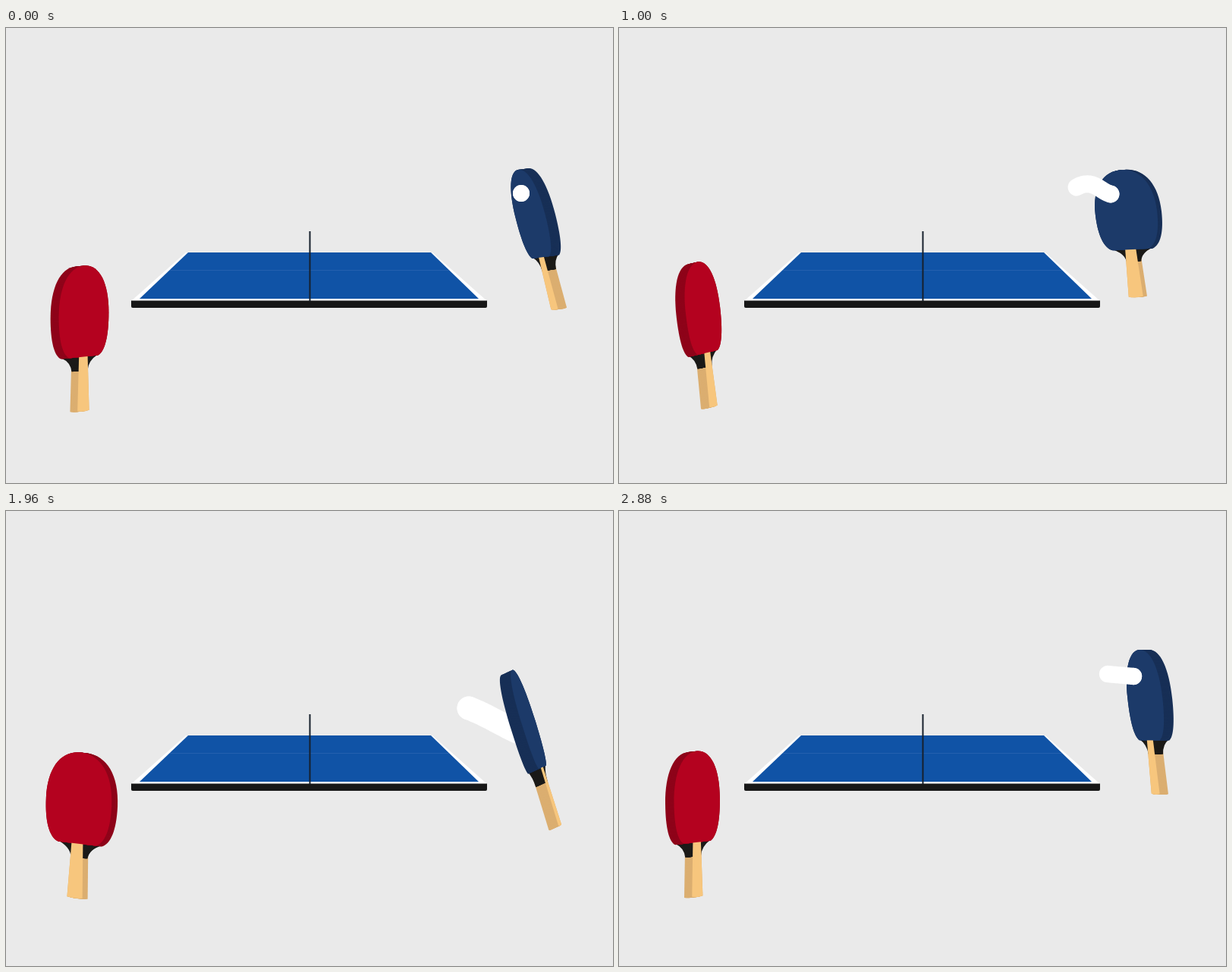
These frames come from a looping animation (800 by 600 pixels, 2920 ms). An HTML page with a canvas:

```html
<!DOCTYPE html>
<html lang="en">
<head>
<meta charset="utf-8">
<title>Table tennis</title>
<style>
html, body { margin: 0; width: 100%; height: 100%; overflow: hidden; background: #eaeaea; }
canvas { display: block; }
</style>
</head>
<body>
<canvas id="stage" width="800" height="600"></canvas>
<script>
const ctx = document.getElementById('stage').getContext('2d');
const LOOP = 2920, STEP = 40, TRAIL = 80;
const BOUNCE_Y = 306;

// time, x, y
const ballKeys = [
  [0, 679, 218], [60, 670, 224], [150, 560, 208], [320, 310, BOUNCE_Y],
  [420, 195, 236], [480, 140, 258], [520, 187, 244], [600, 283, 229],
  [700, 385, 243], [815, 500, BOUNCE_Y], [920, 603, 210], [1000, 648, 219],
  [1025, 655, 222], [1110, 570, 205], [1230, 310, BOUNCE_Y], [1360, 156, 211],
  [1440, 139, 210], [1570, 265, 222], [1720, 505, BOUNCE_Y], [1800, 610, 252],
  [1880, 674, 284], [1910, 676, 292], [1960, 610, 260], [2040, 500, 228],
  [2190, 300, BOUNCE_Y], [2330, 140, 238], [2400, 225, 231], [2480, 342, 234],
  [2560, 417, 253], [2640, 500, BOUNCE_Y], [2735, 603, 211], [2800, 644, 215],
  [2880, 678, 218], [2920, 679, 218]
];

// time, radius
const sizeKeys = [
  [0, 11], [320, 13], [600, 13.5], [920, 11.5], [1025, 11.5],
  [1440, 13.5], [1800, 13.5], [1960, 15.5], [2560, 13.5], [2800, 12], [2920, 11]
];

// time, blade top x y, handle end x y, yaw in degrees
const leftKeys = [
  [0, 97, 314, 97, 506, -51], [100, 100, 320, 94, 511, 0],
  [300, 100, 248, 70, 436, 10], [430, 128, 173, 58, 348, -28],
  [510, 163, 174, 29, 345, -72], [600, 161, 196, 62, 396, -79],
  [840, 98, 319, 106, 511, -66], [1000, 97, 310, 119, 501, -64],
  [1280, 108, 222, 82, 408, -30], [1440, 130, 176, 76, 352, -25],
  [1560, 155, 180, 46, 364, -74], [1900, 103, 325, 93, 517, 25],
  [1960, 103, 319, 94, 511, 34], [2240, 105, 215, 56, 398, 0],
  [2420, 130, 178, 48, 350, -62], [2560, 113, 178, 57, 362, -74],
  [2790, 97, 316, 97, 508, -51], [2920, 97, 314, 97, 506, -51]
];

const rightKeys = [
  [0, 682, 186, 729, 371, 68], [70, 668, 196, 728, 388, 80],
  [140, 662, 215, 720, 412, 84], [600, 699, 273, 671, 456, 55],
  [900, 674, 194, 688, 370, 38], [1000, 665, 187, 684, 355, 28],
  [1120, 660, 206, 717, 398, 76], [1340, 702, 286, 694, 478, 18],
  [1440, 693, 285, 682, 474, 18], [1700, 718, 240, 690, 430, 62],
  [1880, 693, 198, 755, 400, 92], [1960, 660, 213, 724, 418, 99],
  [2040, 664, 238, 712, 440, 94], [2240, 706, 268, 690, 460, 65],
  [2420, 728, 262, 678, 451, 58], [2560, 722, 249, 670, 436, 62],
  [2790, 705, 188, 730, 379, 66], [2880, 693, 183, 713, 374, 64],
  [2920, 682, 186, 729, 371, 68]
];

const red = { face: '#b4021f', edge: '#8e0319' };
const blue = { face: '#1c3a69', edge: '#172f56' };
const wood = { face: '#f7c67d', edge: '#dbae70' };
const black = '#1b1a18';

// Smooth curve through keys, sharp where the ball meets the table.
function slope(keys, i, c, chord) {
  if (c === 2 && keys[i][2] === BOUNCE_Y) return chord * 1.3;
  const last = keys.length - 1;
  const a = i === 0 ? keys[last - 1] : keys[i - 1];
  const b = i === last ? keys[1] : keys[i + 1];
  const dt = (b[0] - a[0] + LOOP) % LOOP;
  return (b[c] - a[c]) / dt;
}

function sample(keys, t) {
  let i = 0;
  while (i < keys.length - 2 && t >= keys[i + 1][0]) i++;
  const a = keys[i], b = keys[i + 1], d = b[0] - a[0], u = (t - a[0]) / d;
  return a.slice(1).map((v, k) => {
    const c = k + 1, gap = b[c] - v, chord = gap / d;
    const m = slope(keys, i, c, chord) * d, n = slope(keys, i + 1, c, chord) * d;
    return v + u * (m + u * (3 * gap - 2 * m - n + u * (m + n - 2 * gap)));
  });
}

function poly(color, points) {
  ctx.fillStyle = color;
  ctx.beginPath();
  points.forEach(([x, y]) => ctx.lineTo(x, y));
  ctx.closePath();
  ctx.fill();
}

function drawTable() {
  poly('#fff', [[237, 296], [562, 296], [634, 360], [165, 360]]);
  poly('#1053a6', [[240, 296], [560, 296], [623, 357], [176, 357]]);
  ctx.fillStyle = '#2460ae';
  ctx.fillRect(216, 319, 368, 1);
  ctx.fillStyle = '#171717';
  ctx.beginPath();
  ctx.roundRect(165, 359.5, 469, 9.5, [0, 0, 2, 2]);
  ctx.fill();
  ctx.fillStyle = '#17202c';
  ctx.fillRect(399.5, 268, 2, 92);
}

function blade(w, h) {
  ctx.beginPath();
  ctx.moveTo(-0.58 * w, h);
  ctx.bezierCurveTo(-0.85 * w, 0.96 * h, -w, 0.8 * h, -w, 0.54 * h);
  ctx.bezierCurveTo(-w, 0.2 * h, -0.6 * w, 0, 0, 0);
  ctx.bezierCurveTo(0.6 * w, 0, w, 0.2 * h, w, 0.54 * h);
  ctx.bezierCurveTo(w, 0.8 * h, 0.85 * w, 0.96 * h, 0.58 * w, h);
  ctx.closePath();
  ctx.fill();
}

function neck(w, grip, y0, y1) {
  const mid = y0 + (y1 - y0) * 0.3;
  ctx.beginPath();
  ctx.moveTo(-0.58 * w, y0 - 1);
  ctx.quadraticCurveTo(-grip * 1.2, mid, -grip, y1);
  ctx.lineTo(grip, y1);
  ctx.quadraticCurveTo(grip * 1.2, mid, 0.58 * w, y0 - 1);
  ctx.closePath();
  ctx.fill();
}

function handle(grip, y0, y1) {
  ctx.beginPath();
  ctx.moveTo(-grip, y0);
  ctx.lineTo(grip, y0);
  ctx.lineTo(grip * 1.35, y1 - 1);
  ctx.quadraticCurveTo(0, y1 + 1, -grip * 1.35, y1 - 1);
  ctx.closePath();
  ctx.fill();
}

function shifted(x, draw) {
  ctx.save();
  ctx.translate(x, 0);
  draw();
  ctx.restore();
}

// Sweeps a shape sideways from its back plane to its front plane.
function extrude(depth, color, draw) {
  ctx.fillStyle = color;
  const n = Math.max(1, Math.ceil(Math.abs(depth)));
  for (let i = 0; i <= n; i++) shifted(depth * (0.5 - i / n), draw);
}

function drawPaddle(keys, t, skin) {
  const [tx, ty, bx, by, yaw] = sample(keys, t);
  const angle = (yaw > 90 ? yaw - 180 : yaw) * Math.PI / 180;
  const len = Math.hypot(bx - tx, by - ty), s = len / 191;
  const turn = Math.sin(angle), open = Math.cos(angle) * s;
  const w = 52 * open, grip = 9 * open;
  const thick = 14 * s * turn, gripThick = 12.5 * s * turn;
  const h = 0.625 * len, neckEnd = 0.72 * len;

  ctx.save();
  ctx.translate(tx, ty);
  ctx.rotate(Math.atan2(by - ty, bx - tx) - Math.PI / 2);
  ctx.transform(1, 0.13 * turn, 0, 1, 0, 0);
  extrude(gripThick, wood.edge, () => handle(grip, h, len));
  extrude(gripThick, black, () => neck(w, grip, h, neckEnd));
  extrude(thick, skin.edge, () => blade(w, h));
  ctx.fillStyle = wood.face;
  shifted(-gripThick / 2, () => handle(grip, h - 1, len));
  ctx.fillStyle = skin.face;
  shifted(-thick / 2, () => blade(w, h));
  ctx.restore();
}

function drawBall(t) {
  const [r] = sample(sizeKeys, t), [x, y] = sample(ballKeys, t);
  ctx.strokeStyle = ctx.fillStyle = '#fff';
  ctx.lineWidth = 2 * r;
  ctx.lineCap = ctx.lineJoin = 'round';
  ctx.beginPath();
  for (let p = Math.max(0, t - TRAIL); p <= t; p += 4) ctx.lineTo(...sample(ballKeys, p));
  ctx.stroke();
  ctx.beginPath();
  ctx.arc(x, y, r, 0, 7);
  ctx.fill();
}

function render(t) {
  ctx.fillStyle = '#eaeaea';
  ctx.fillRect(0, 0, 800, 600);
  drawTable();
  const behind = t >= 1880 && t <= 2000;
  drawPaddle(leftKeys, t, red);
  if (behind) drawBall(t);
  drawPaddle(rightKeys, t, blue);
  if (!behind) drawBall(t);
}

const start = performance.now();
function tick() {
  const t = (performance.now() - start) % LOOP;
  render(Math.floor(t / STEP) * STEP);
  requestAnimationFrame(tick);
}
tick();
</script>
</body>
</html>
```
